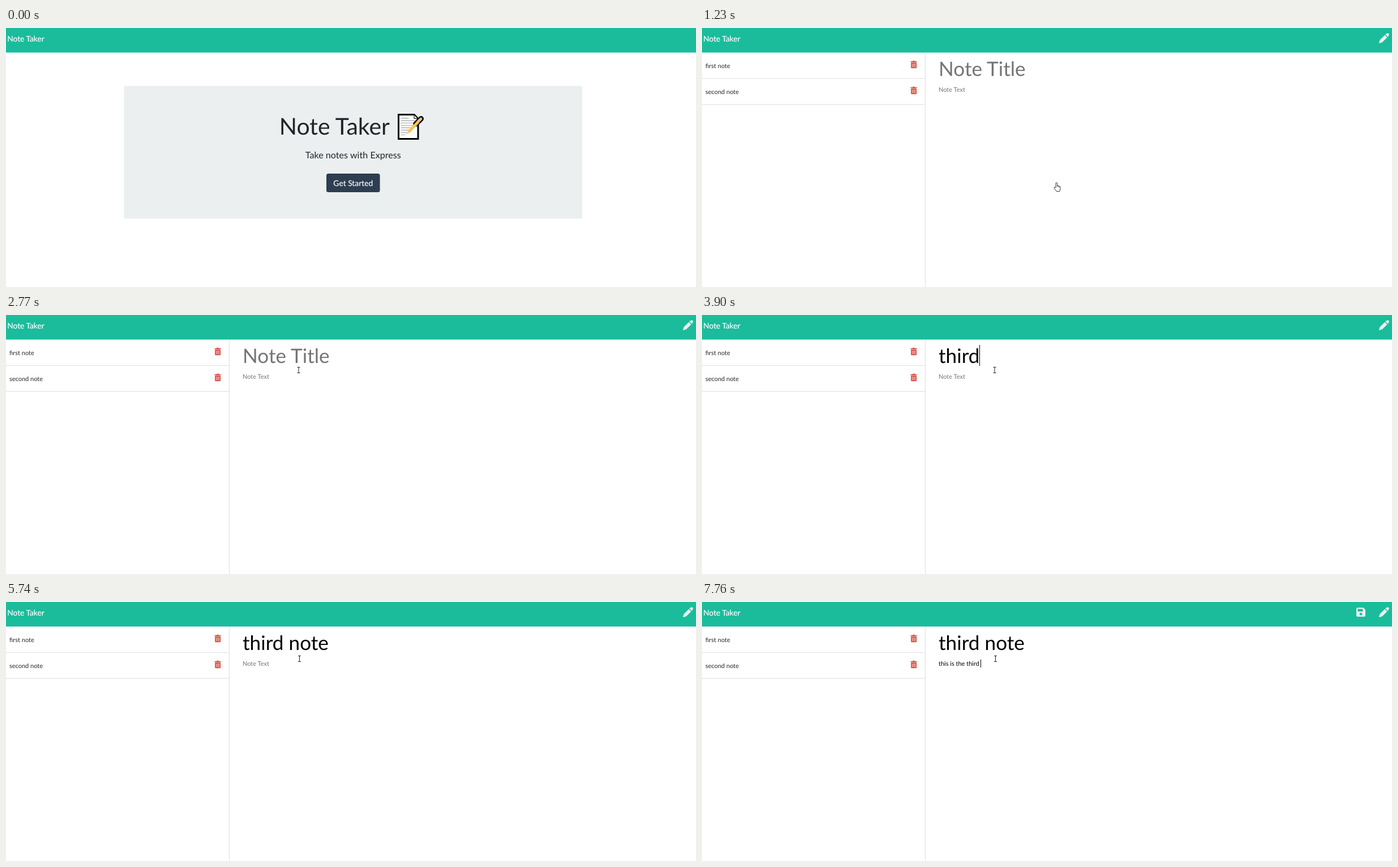
Write an HTML page that moves like this. It is 1219 by 459 pixels and loops after 8000 ms.

```html
<!DOCTYPE html>
<html lang="en">
<head>
<meta charset="utf-8">
<title>Note Taker</title>
<style>
html, body { margin: 0; width: 100%; height: 100%; overflow: hidden; background: #fff; }
svg { display: block; width: 1219px; height: 459px; }
text { font-family: Lato, sans-serif; white-space: pre; text-rendering: geometricPrecision; fill: #212529; }
.small { font-size: 11px; }
.title { font-size: 35.2px; }
.mid { text-anchor: middle; }
.light { fill: #fff; stroke: #fff; stroke-width: .2px; }
.typed { fill: #000; }
.hint { fill: #747474; }
</style>
</head>
<body>
<svg viewBox="0 0 1219 459">
  <defs>
    <g id="trash">
      <g fill="#d4463b">
        <rect x="3.6" width="4.2" height="2" rx=".6"/>
        <rect y=".9" width="11.4" height="1.7" rx=".4"/>
        <rect x=".8" y="3.3" width="9.8" height="9.9" rx="1.2"/>
      </g>
      <path d="M3.3 5V11.6M5.7 5V11.6M8.1 5V11.6" stroke="#fff" stroke-width=".9"/>
    </g>
  </defs>
  <rect width="1219" height="43.5" fill="#1abc9c"/>
  <text class="light" x="2.2" y="24" font-size="13.75">Note Taker</text>

  <g id="home">
    <rect x="208.5" y="102.5" width="809.5" height="235.2" rx="3.5" fill="#ebeff0"/>
    <text x="482.8" y="189.2" font-size="41">Note Taker</text>
    <g stroke-linecap="round">
      <path d="M693.5 153.5H721L728 160.5V196.5H693.5Z" fill="#fff" stroke="#000" stroke-width="3"/>
      <path d="M721 154V160.5H727.5Z" fill="#ddd" stroke="#000"/>
      <path id="lines" fill="none" stroke="#b0b0b0" stroke-width="1.4"/>
      <path d="M724 170L733.3 160.8" stroke="#000" stroke-width="9.4"/>
      <path d="M728 166L733 161" stroke="#e6bd9d" stroke-width="4.6"/>
      <path d="M711 184.5L728.5 166" stroke="#f7c64a" stroke-width="5" stroke-linecap="butt"/>
      <path d="M706.5 189L709.2 182.8L712.8 186.2Z" fill="#f3d9a4"/>
    </g>
    <text class="mid" x="613.3" y="231" font-size="16.15">Take notes with Express</text>
    <rect id="button" x="566" y="258" width="94.6" height="33.1" rx="3.5"/>
    <text class="mid light" x="613.3" y="279.8" font-size="13.85">Get Started</text>
  </g>

  <g id="notes">
    <path d="M0 89.5H394.5M0 135.5H392Q394.5 135.5 394.5 133M394.5 43.5V459" fill="none" stroke="#dfdfdf"/>
    <text class="small" x="6" y="70.6">first note</text>
    <text class="small" x="6" y="116.6">second note</text>
    <use href="#trash" x="368.4" y="58"/>
    <use href="#trash" x="368.4" y="104"/>
    <g stroke="#ecf0f1" stroke-width="6">
      <path d="M1199 24L1208.4 14.6"/>
      <path d="M1209.4 13.6L1211 12" stroke-linejoin="round"/>
      <path d="M1196.5 26.5L1197.4 22.9L1200.1 25.6Z" fill="#ecf0f1" stroke-width="1"/>
      <circle cx="1211.4" cy="11.6" r="2.4" fill="#ecf0f1" stroke="none"/>
    </g>
    <g id="save" fill="#1abc9c">
      <path d="M1157.5 10H1168.2L1172 13.8V24.5L1170.5 26H1157.5L1156 24.5V11.5Z" fill="#ecf0f1"/>
      <rect x="1158.4" y="12.3" width="9" height="4.5"/>
      <circle cx="1164" cy="21.2" r="2.3"/>
    </g>
    <text id="title" class="title" x="418" y="85"></text>
    <text id="body" class="small" x="418" y="112.6"></text>
    <rect id="caret" width="1"/>
  </g>

  <g id="mouse" stroke="#000" stroke-width=".8" stroke-linejoin="round">
    <path id="arrow" d="M0 0V12.5L2.9 9.8L4.8 14.2L6.7 13.4L4.8 9.1H8.7Z" fill="#fff"/>
    <g id="hand">
      <path d="M0 1.3Q0 0 1.3 0T2.6 1.3V5.4L6 6.1Q8 6.6 8 8.4V11L6.6 15.6H1.4L-2.6 10Q-3.6 8.6 -2.4 8T0 9Z" fill="#fff"/>
      <path d="M2.6 5.4V8M4.5 6V8.3M6.3 6.4V8.6" stroke-width=".5"/>
    </g>
    <path id="beam" d="M-2.5 -5H2.5M0 -5V5M-2.5 5H2.5" stroke="#222" stroke-width="1"/>
  </g>
</svg>
<script>
const LOOP = 8000, OPEN = 1230, BLINK = 530, STEP = 75;
const $ = id => document.getElementById(id);
const show = (id, on) => $(id).setAttribute("visibility", on ? "inherit" : "hidden");
const clamp = u => Math.max(0, Math.min(1, u));

// Each move: first step, last step, end point
const START = [1178, 485];
const MOVES = [
  [70, 370, 556, 209],
  [610, 920, 625, 274],
  [1310, 1380, 575, 253],
  [1460, 1850, 498, 64],
  [2090, 2390, 497, 84],
  [2550, 2700, 517, 97.5],
  [4970, 5270, 518.5, 100.5]
];

// Bursts of typing; a pace above 1 slows down towards the end
const TITLE = {
  id: "title", hint: "Note Title", focus: 2240, top: 53, size: 37,
  bursts: [{ text: "third note", from: 3400, to: 4500, pace: 1 }]
};
const BODY = {
  id: "body", hint: "Note Text", focus: 5210, top: 102, size: 14,
  bursts: [
    { text: "this is ", from: 5830, to: 6370, pace: 1 },
    { text: "the third ", from: 6450, to: 7760, pace: 1.33 }
  ]
};

function mouseAt(t) {
  let [x, y] = START;
  for (const [t0, t1, ex, ey] of MOVES) {
    if (t < t0) break;
    const n = Math.round((t1 - t0) / STEP);
    const u = clamp((Math.floor((t - t0) / (t1 - t0) * n) + 1) / (n + 1));
    x += (ex - x) * u;
    y += (ey - y) * u;
  }
  return [x, y];
}

// Text typed so far and the time of the last key
function typed(field, t) {
  let text = "", last = field.focus;
  for (const b of field.bursts) {
    if (t < b.from) break;
    const n = b.text.length - 1, span = b.to - b.from;
    const k = Math.floor(n * clamp((t - b.from) / span) ** (1 / b.pace) + 1e-6);
    text += b.text.slice(0, k + 1);
    last = b.from + span * (k / n) ** b.pace;
  }
  return { text, last };
}

function drawField(field, t) {
  const { text, last } = typed(field, t), el = $(field.id);
  el.textContent = text || field.hint;
  el.classList.toggle("typed", !!text);
  el.classList.toggle("hint", !text);
  return { text, last, width: text ? el.getComputedTextLength() : 0 };
}

function drawCaret(field, state, t) {
  const c = $("caret");
  c.setAttribute("x", Math.round(417.6 + state.width));
  c.setAttribute("y", field.top);
  c.setAttribute("height", field.size);
  show("caret", t >= OPEN && t >= field.focus && Math.floor((t - state.last) / BLINK) % 2 === 0);
}

function buttonColor(t) {
  const u = clamp((t - 690) / 150), mix = (a, b) => Math.round(a + (b - a) * u);
  return `rgb(${mix(44, 30)},${mix(62, 42)},${mix(80, 54)})`;
}

function draw(t) {
  const open = t >= OPEN;
  show("home", !open);
  show("notes", open);
  $("button").setAttribute("fill", buttonColor(t));

  const title = drawField(TITLE, t), body = drawField(BODY, t);
  if (t < BODY.focus) drawCaret(TITLE, title, t);
  else drawCaret(BODY, body, t);
  show("save", !!body.text);

  const [x, y] = mouseAt(t);
  $("mouse").setAttribute("transform", `translate(${x} ${y})`);
  show("mouse", t >= MOVES[0][0]);
  const beam = t >= MOVES[2][0], hand = !beam && t >= 760;
  show("beam", beam);
  show("hand", hand);
  show("arrow", !beam && !hand);
}

// Ruled lines of the notepad, cut short where the pencil lies
let rules = "";
for (let i = 0; i < 8; i++) {
  const y = 160 + i * 4.2;
  rules += `M698.5 ${y}H${i ? Math.min(722, 730 - i * 3.6) : 711}`;
}
$("lines").setAttribute("d", rules);

const begin = performance.now();
function tick() {
  draw((performance.now() - begin) % LOOP);
  requestAnimationFrame(tick);
}
draw(0);
requestAnimationFrame(tick);
</script>
</body>
</html>
```
